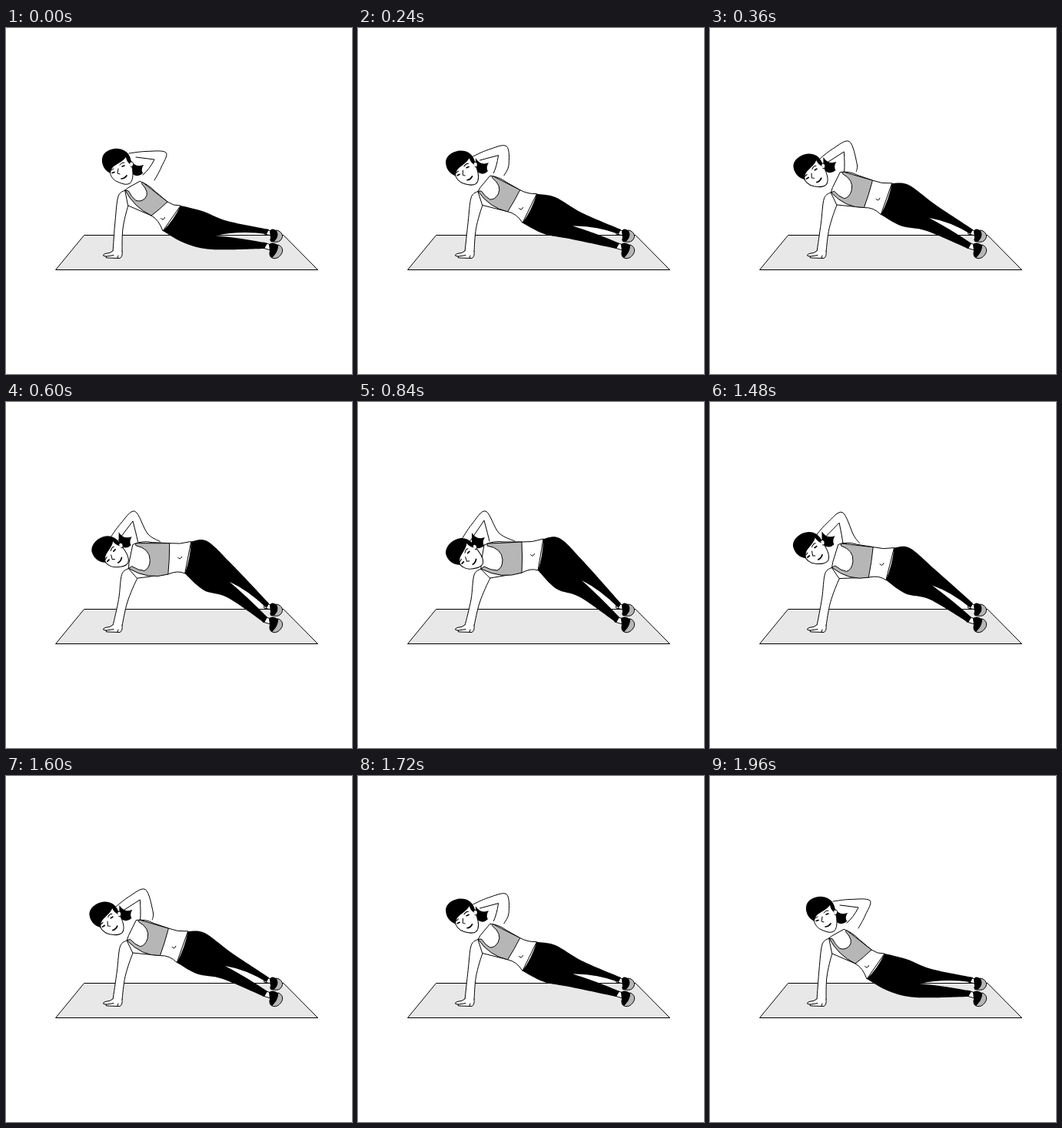
An HTML page for the animation above (2.32 s loop, 450 px wide and 450 px high).

```html
<!DOCTYPE html>
<html lang="en">
<head>
<meta charset="utf-8">
<title>Side plank</title>
<style>
html, body { margin: 0; width: 100%; height: 100%; overflow: hidden; background: #fff; }
svg { display: block; width: 100%; height: 100%; }
.line { fill: none; stroke: #000; stroke-width: 1; stroke-linejoin: round; stroke-linecap: round; }
.skin { fill: #fff; }
.grey { fill: #b6b6b6; }
.black { fill: #000; }
</style>
</head>
<body>
<svg viewBox="0 0 450 450">
  <path class="line" style="fill:#e8e8e8" d="M102 269.500H361L405.500 314.500H65Z"/>
  <path id="prop" class="line skin"/>
  <path class="line skin" d="M139 290Q136 293 129 293.500Q125 295 127 296.500L131 297Q128 299 133 299L148 299.500Q152 298 151 290M131 297L140 295.500M145 299L146 296"/>
  <path id="torso" class="line skin"/>
  <path id="top" class="line grey"/>
  <path id="navel" class="line"/>
  <path class="line skin" d="M336 262L346 264L345 270L336 268ZM335 279L345 282L344 289L334 286Z"/>
  <path id="pants" class="black"/>
  <path class="line grey" d="M351 263C357 263 361 269 359 273C357 278 353 279 348 278ZM354 282C360 284 361 290 358 294C355 299 350 301 346 299Z"/>
  <path class="black" d="M343 265C344 260 349 261 352 264C355 268 353 275 348 278C345 279 342 277 344 273ZM342 282C344 278 351 279 354 283C354 290 350 295 346 299C342 298 342 292 343 290Z"/>
  <path id="arm" class="line"/>
  <path id="bob" class="black" d="M-9 -12Q-3 -2 8 -6Q4 0 7 5Q0 12 -9 4Z"/>
  <g id="head">
    <path class="line skin" d="M-14 4C-12 12 -10 17 -3 20C2 22 8 25 13 22C17 19 18 11 16 1L8 -15Z"/>
    <path class="black" d="M-12 9C-20 6 -24 -3 -23 -10C-22 -19 -11 -24 -2 -23C7 -22 12 -17 14 -10L16 -1C11 -4 9 -7 8 -12C4 -6 -5 -3 -9 1C-11 4 -12 6 -12 9Z"/>
    <path class="line skin" d="M13 -5C16 -8 19 -4 17 -1Q16 2 14 0"/>
    <path class="line" d="M-11 5L-8 3M0 -2Q3 -6 6 -5M-2 3L-3 9L0 10"/>
    <path class="line" style="stroke-width:1.700" d="M-10 8.500L-7 7.500M3 0L6 -1M2 16Q6 16 9 12"/>
  </g>
</svg>
<script>
// Each joint: low x, y, raised x, y, then how far its way bends aside.
const joints = {
  head: [148, 180, 140, 198, -11, -3],
  bob: [171, 184, 157, 182, -8, -3],
  shoulder: [155, 211, 160, 217, 0, 0],
  pit: [159, 231, 172, 229, 0, 0],
  chest: [210, 226, 213, 182, 0, -7],
  rib: [189, 244, 213, 222, 0, 0],
  waist: [227, 231, 241, 178, 3, -4],
  belly: [204, 264, 234, 219, 4, 0],
  hip: [255, 238, 262, 177, 0, -5],
  thigh: [288, 251, 291, 205, 3, 0],
  crotch: [272, 270, 291, 232, 4, -5],
  calf: [268, 288, 289, 254, 4, -8],
  seat: [233, 280, 258, 243, 4, -5],
  hand: [160, 163, 134, 180, -6, 0],
  elbow: [208, 162, 166, 142, -7, -5],
  upper: [202, 181, 183, 170, -2, 0],
  far: [193, 198, 204, 181, -8, -3],
  crook: [193, 171, 164, 154, -5, -2],
  inner: [178, 191, 171, 181, 0, 0]
};
const farAnkle = [[342, 262], [339, 268]];
const nearAnkle = [[340, 280], [336, 287]];

// Drawn for the raised pose; follows shoulder, chest and rib.
const topShape = 'M160 217L164 214Q173 219 181 219Q188 216 188 205Q187 190 168 187L168 184Q195 183 213 182Q214 202 213 222Q187 231 160 217Z';
const neckShape = 'L160 210L164 186Q176 180 190 182L213 182';

const add = ([x, y], dx, dy) => [x + dx, y + dy];
const mid = (a, b, dx = 0, dy = 0) => [(a[0] + b[0]) / 2 + dx, (a[1] + b[1]) / 2 + dy];
const text = p => p.map(v => v.toFixed(2)).join(' ');
const set = (id, name, value) => document.getElementById(id).setAttribute(name, value);

// Smooth curve through points, continuing from the first one.
function spline(pts) {
  let d = text(pts[0]);
  for (let i = 1; i < pts.length; i++) {
    const a = pts[i - 1], b = pts[i];
    const before = pts[i - 2] || a, after = pts[i + 1] || b;
    const c1 = add(a, (b[0] - before[0]) / 6, (b[1] - before[1]) / 6);
    const c2 = add(b, (a[0] - after[0]) / 6, (a[1] - after[1]) / 6);
    d += 'C' + [c1, c2, b].map(text).join(' ');
  }
  return d;
}

function bow(a, b, dx, dy) {
  return 'Q' + text(mid(a, b, dx, dy)) + ' ' + text(b);
}

function fitChest(path, { shoulder: s, chest: c, rib: r }) {
  return path.replace(/(\d+) (\d+)/g, (_, x, y) => {
    const sum = (x - 160) / 53;
    const u = (5 * sum - (y - 217)) / 40, v = sum - u;
    return text([0, 1].map(i => s[i] + u * (c[i] - s[i]) + v * (r[i] - s[i])));
  });
}

function drawPose(p) {
  const j = {};
  for (const name in joints) {
    const [x0, y0, x1, y1, bx, by] = joints[name];
    const side = 4 * p * (1 - p);
    j[name] = [x0 + (x1 - x0) * p + bx * side, y0 + (y1 - y0) * p + by * side];
  }
  const wristL = [139, 291], wristR = [151, 291];

  set('prop', 'd', 'M' + spline([j.shoulder, add(j.shoulder, -9, 8), add(j.shoulder, -13, 40), wristL]) +
    'L' + spline([wristR, mid(wristR, j.pit, -3), j.pit, add(j.pit, 5, -3)]));
  set('torso', 'd', 'M' + text(j.shoulder) + fitChest(neckShape, j) +
    bow(j.chest, j.waist, -1, 3) + 'L' + text(j.belly) + bow(j.belly, j.rib, 2, -5) +
    'L' + text(j.pit) + 'Z');
  set('top', 'd', fitChest(topShape, j));
  set('navel', 'd', 'M' + text(mid(j.waist, j.belly, -14 + p, 0)) + 'q3 4 5 -1');
  set('pants', 'd', 'M' + spline([j.waist, j.hip, j.thigh, farAnkle[0]]) +
    'L' + text(farAnkle[1]) + bow(farAnkle[1], j.crotch, 0, -6) +
    bow(j.crotch, nearAnkle[0], 0, -2) +
    'L' + spline([nearAnkle[1], j.calf, j.seat, j.belly]) + bow(j.belly, j.waist, 3, 2) + 'Z');
  set('arm', 'd', 'M' + spline([j.hand, mid(j.hand, j.elbow, -2, -2), j.elbow, j.upper, j.far]) +
    'M' + text(add(j.hand, 9, 5)) + 'L' + text(j.crook) + bow(j.crook, j.inner, 1, 3));
  set('bob', 'transform', `translate(${text(j.bob)})`);
  set('head', 'transform', `translate(${text(j.head)}) rotate(${-28 * p})`);
}

const step = 120, lower = 1240, loop = 2320;
const start = performance.now();

function frame(now) {
  const t = Math.max(now - start, 0) % loop;
  const pose = t < lower ? Math.min(Math.floor(t / step), 7)
                         : Math.max(6 - Math.floor((t - lower) / step), 0);
  drawPose((1 - Math.cos(Math.PI * Math.min(pose / 6.2, 1))) / 2);
  requestAnimationFrame(frame);
}
frame(start);
</script>
</body>
</html>
```
